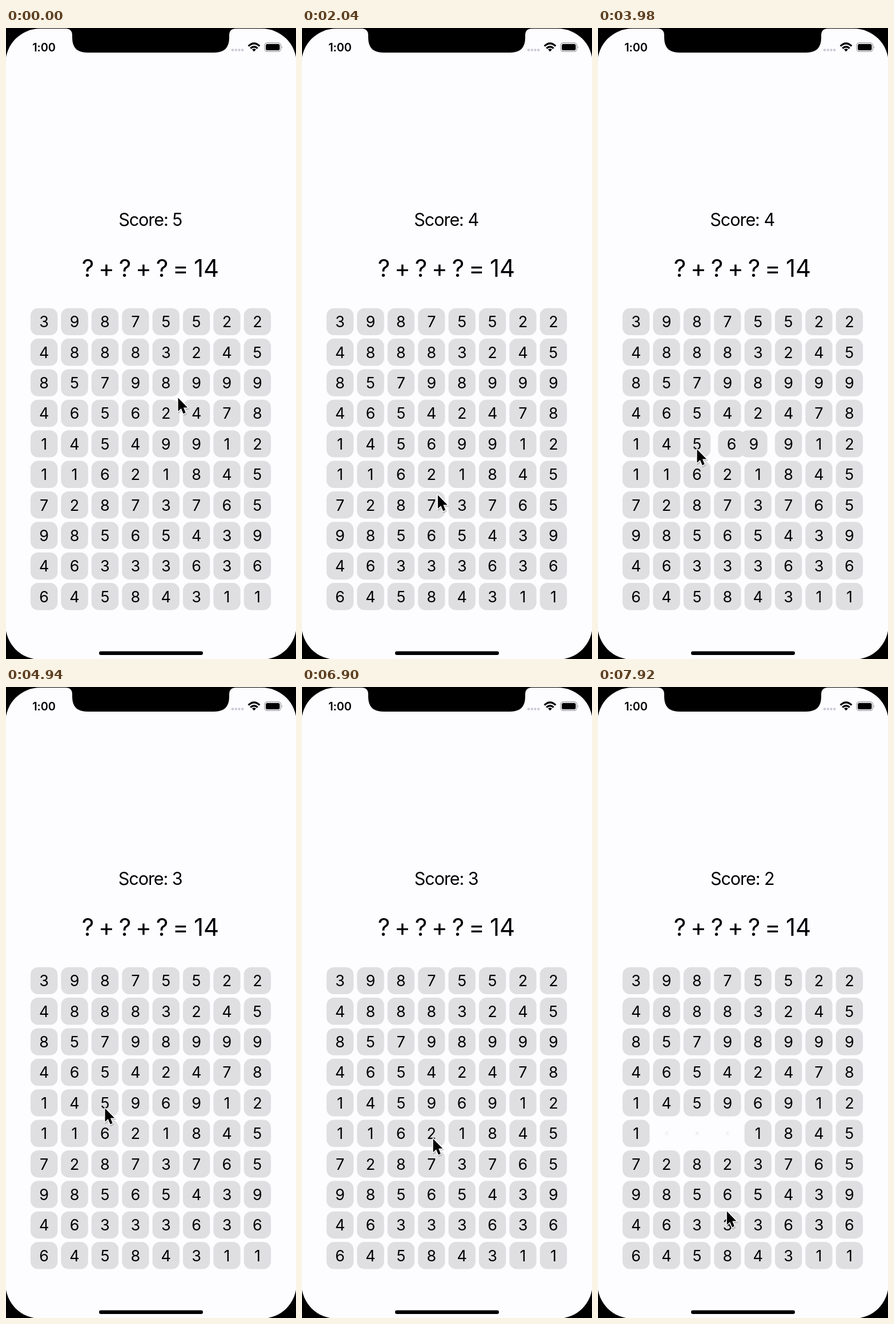
Recreate the animation shown at these times as an HTML page. Size 508x1103 px, loop 8 s.

```html
<!DOCTYPE html>
<html lang="en">
<head>
<meta charset="utf-8">
<title>Number swap game</title>
<style>
  html, body { margin: 0; width: 100%; height: 100%; overflow: hidden; background: #000; }
  svg { display: block; width: 508px; height: 1103px; }
  text { font-family: Inter, Roboto, sans-serif; fill: #000; text-anchor: middle; }
  .clock { font-size: 20px; font-weight: 600; letter-spacing: -.2px; }
  .score { font-size: 30.5px; letter-spacing: -1.05px; }
  .sum { font-size: 42px; }
  .tile text { font-size: 27px; }
  .tile rect { fill: #dfdfe2; }
</style>
</head>
<body>
<svg viewBox="0 0 508 1103">
  <defs>
    <path id="arrow" d="M0 0V23.5L5.3 18.6L9.2 27.8L13.2 26L9.4 17H16.6Z" stroke-width="3" stroke-linejoin="round" paint-order="stroke"/>
  </defs>
  <rect x="-1" y="1" width="510" height="1103" rx="61" fill="#fdfcff"/>
  <path d="M104 0V1Q116 1 116 13V17Q116 43 142 43H365Q391 43 391 17V13Q391 1 403 1V0Z"/>

  <text class="clock" x="66.5" y="41">1:00</text>
  <path d="M397 38.5H415" stroke="#cbcad6" stroke-width="4.4" stroke-linecap="round" stroke-dasharray="0 5.75"/>
  <g fill="none" stroke="#000" stroke-width="3.2">
    <path d="M424.7 31.7Q434.5 22.3 444.3 31.7"/>
    <path d="M428.3 35.6Q434.5 29.8 440.7 35.6"/>
  </g>
  <path d="M431 37.6Q434.5 34.8 438 37.6L434.5 41.2Z"/>
  <rect x="453" y="26" width="28.5" height="15" rx="4.5" fill="none" stroke="#a3a2a8" stroke-width="1.3"/>
  <rect x="455" y="28" width="24.5" height="11" rx="2.8"/>
  <path d="M483 31Q485.3 33.5 483 36Z" fill="#a3a2a8"/>

  <text class="score" id="score" x="252.7" y="345.5">Score: 5</text>
  <g id="sum"></g>
  <g id="board"></g>
  <rect x="163" y="1089.5" width="182" height="6.5" rx="3.25"/>
  <g id="cursor">
    <use href="#arrow" x="1" y="2" stroke="#000" opacity=".18"/>
    <use href="#arrow" stroke="#fff"/>
  </g>
</svg>
<script>
const LOOP = 8000, LAST = 7920, COLS = 8, PITCH = 53.38;
const MOVE = 350;     // length of a swap or a vanishing
const SETTLE = 540;   // from a swap to its effect on the score
const START_SCORE = 5;

const rows = `39875522 48883245 85798999 46562478 14549912
              11621845 72873765 98565439 46333636 64584311`;

// Each swap: the pointer hovers, presses on one slot and is let go at drop.
const swaps = [
  { at: 1010, from: 27, to: 35, hover: [301.5, 646.5], drop: [238, 816.5] },
  { at: 3900, from: 36, to: 35, hover: [288.5, 756.5], drop: [173.5, 736.5] },
  { at: 7119, from: 43, to: 51, hover: [247, 781.5], drop: [225.8, 916.5] }
];
const matchSlots = [41, 42, 43];
const matchTime = swaps.at(-1).at + SETTLE;

const byId = id => document.getElementById(id);
const board = byId('board'), cursor = byId('cursor'), score = byId('score');
const mix = (a, b, k) => a + (b - a) * k;
const ease = x => { x = Math.min(1, Math.max(0, x)); return x * x * (3 - 2 * x); };
const centre = s => [66.7 + s % COLS * PITCH, 513.4 + Math.floor(s / COLS) * PITCH];
const between = (p, q, k) => [mix(p[0], q[0], k), mix(p[1], q[1], k)];

function add(parent, name, attrs) {
  const el = document.createElementNS('http://www.w3.org/2000/svg', name);
  for (const key in attrs) el.setAttribute(key, attrs[key]);
  return parent.appendChild(el);
}

function place(el, [x, y], scale = 1) {
  el.setAttribute('transform', `translate(${x} ${y}) scale(${scale})`);
}

[...'?+?+?='].forEach((sign, i) => {
  add(byId('sum'), 'text', { class: 'sum', x: 143.5 + i * 32.5, y: 435 }).textContent = sign;
});
add(byId('sum'), 'text', { class: 'sum', x: 351, y: 435 }).textContent = '14';

const tiles = [...rows.replace(/\s/g, '')].map((digit, slot) => {
  const el = add(board, 'g', { class: 'tile' });
  add(el, 'rect', { x: -23.7, y: -23.7, width: 47.4, height: 47.4, rx: 13 });
  add(el, 'text', { y: 9.9 }).textContent = digit;
  place(el, centre(slot));
  return { el, home: slot, hops: [] };
});

// Play the swaps once to learn which tile hops where.
const inSlot = [...tiles];
for (const { at, from, to } of swaps) {
  const a = inSlot[from], b = inSlot[to];
  a.hops.push({ at, from, to });
  b.hops.push({ at, from: to, to: from });
  inSlot[from] = b;
  inSlot[to] = a;
  board.append(from < to ? a.el : b.el);   // the later slot lies on top
}
const matched = matchSlots.map(s => inSlot[s]);
const active = tiles.filter(t => t.hops.length || matched.includes(t));

const pointer = swaps.flatMap(({ at, from, hover, drop }) => {
  const [x, y] = centre(from), press = [x + 3, y + 6];
  return [
    { t: at - 970, p: hover }, { t: at - 380, p: press }, { t: at - 240, p: press },
    { t: at - 10, p: drop }, { t: at + 1050, p: drop }
  ];
});

function drawTile(tile, t) {
  const hop = tile.hops.filter(h => h.at <= t).pop();
  const pos = hop
    ? between(centre(hop.from), centre(hop.to), ease((t - hop.at) / MOVE))
    : centre(tile.home);
  const left = matched.includes(tile) ? 1 - ease((t - matchTime) / MOVE) : 1;
  place(tile.el, pos, left);
  tile.el.setAttribute('opacity', left);
}

function drawCursor(t) {
  const next = pointer.findIndex(key => key.t > t);
  const b = pointer[next], a = pointer[next - 1] || b;
  place(cursor, between(a.p, b.p, ease((t - a.t) / (b.t - a.t || 1))));
}

function draw() {
  const t = Math.min(performance.now() % LOOP, LAST);
  active.forEach(tile => drawTile(tile, t));
  drawCursor(t);
  const lost = swaps.filter(s => s.at + SETTLE <= t).length;
  score.textContent = 'Score: ' + (START_SCORE - lost);
  requestAnimationFrame(draw);
}
draw();
</script>
</body>
</html>
```
